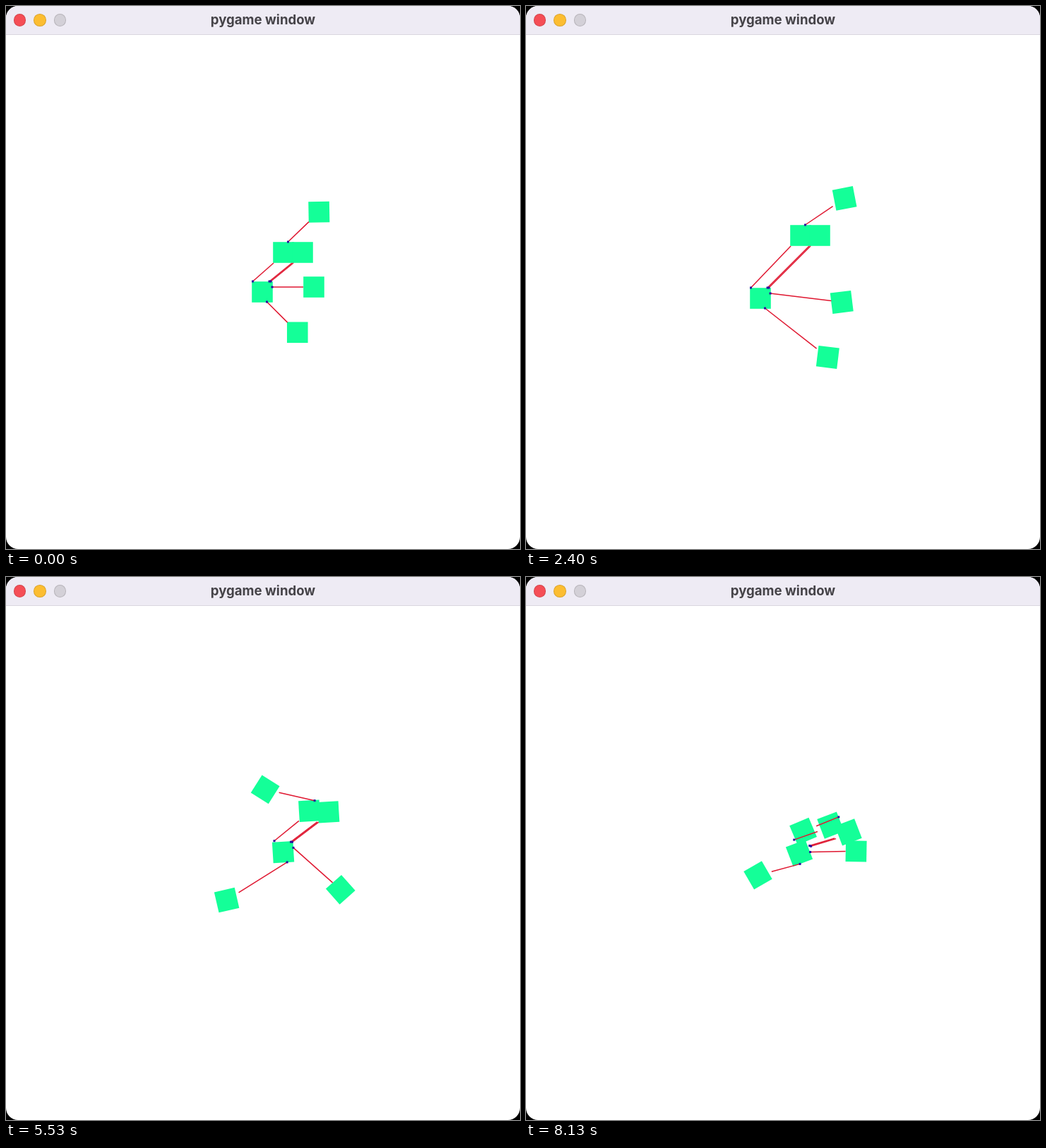
Recreate the animation shown at these times as an HTML page with a canvas. Size 728x769 px, loop 8190 ms.

```html
<!DOCTYPE html>
<html lang="en">
<head>
<meta charset="utf-8">
<title>pygame window</title>
<style>
  html, body { margin: 0; width: 100%; height: 100%; overflow: hidden; background: #000; }
  #window { position: relative; width: 728px; height: 769px; background: #fff; border-radius: 17px; overflow: hidden; }
  header { position: absolute; top: 0; left: 0; width: 728px; height: 40px; background: #eeebf4; border-bottom: 1px solid #dad7df;
    font: 700 18.6px/38px Inter, "Open Sans", sans-serif; color: #454348; text-align: center; }
  i { position: absolute; top: 11px; width: 17.5px; height: 17.5px; border-radius: 50%; box-sizing: border-box; border: 1px solid #0002; }
  canvas { position: absolute; top: 0; left: 0; }
</style>
</head>
<body>
<div id="window">
  <header>
    <i style="left:10.5px;background:#f54e56"></i>
    <i style="left:39px;background:#fcbd31"></i>
    <i style="left:67.5px;background:#d3d0d7"></i>
    pygame window
  </header>
  <canvas width="728" height="769"></canvas>
</div>
<script>
const ctx = document.querySelector('canvas').getContext('2d');
const LOOP = 8.19, FPS = 15, SIZE = 29.6;
const rad = deg => deg * Math.PI / 180;

// Eased path through [time, value] points, held at both ends
function glide(t, ...points) {
  let [t0, value] = points[0];
  for (const [t1, next] of points) {
    if (t < t1) {
      const u = Math.max(0, (t - t0) / (t1 - t0));
      return value + (next - value) * u * u * (3 - 2 * u);
    }
    [t0, value] = [t1, next];
  }
  return value;
}

// Spring length swinging around its mean, longest at the given time
const bounce = (t, mean, amp, peak, period) => mean + amp * Math.cos(2 * Math.PI * (t - peak) / period);

// Point at a local offset from a pose, turned with it
function at({ x, y, angle }, dx, dy) {
  const c = Math.cos(rad(angle)), s = Math.sin(rad(angle));
  return { x: x + dx * c - dy * s, y: y + dx * s + dy * c, angle };
}

// Box hanging on a joint; its anchor, held at the rest direction, faces the joint
function limb(joint, direction, length, rest, reach) {
  const ray = { ...joint, angle: direction };
  return {
    box: { ...at(ray, length, 0), angle: direction - rest },
    spring: [at(ray, length - reach, 0), joint]
  };
}

function scene(t) {
  const hub = {
    x: glide(t, [0, 363], [1.4, 353.5], [2.4, 332], [3.6, 421], [6.2, 387]),
    y: glide(t, [0, 405], [1.4, 399], [2.4, 414], [4.8, 404], [6.2, 377], [8.13, 391]),
    angle: glide(t, [2.4, 0], [3.6, -56], [6.4, 21])
  };
  const stretch = glide(t, [1.4, 0], [2.4, 1], [4.8, 0], [6.2, 0.25], [8.13, -0.1]);
  const left = at(hub, 30 + 27 * stretch, -56 - 33 * stretch);
  const right = at(left, 27, 0);

  const top = limb(at(left, 6.5, -15),
    glide(t, [0, -44], [1.4, -42], [2.4, -34], [3.6, -50], [6.4, -202]),
    bounce(t, 64, 12, 1.4, 4.8), -45, 20);
  const side = limb(at(hub, 14, -7),
    glide(t, [0, 0], [1.4, 10], [2.4, 7], [3.6, 69], [8.13, -1]),
    glide(t, [1.4, 59], [2.4, 102], [3.6, 56], [4.8, 98], [7, 65]), 0, 15);
  const bottom = limb(at(hub, 6.5, 14),
    glide(t, [1.4, 45], [2.4, 38], [3.6, 129], [4.8, 149], [6.2, 147], [8.13, 165]),
    bounce(t, 88, 27, 2.13, 4.1), 45, 20);

  return {
    boxes: [hub, left, right, top.box, side.box, bottom.box],
    springs: [
      top.spring, side.spring, bottom.spring,
      [at(left, -14, 15), at(hub, -13.5, -15)],
      [at(left, 12, 15), at(hub, 10, -15)],
      [at(right, -13, 15), at(hub, 12, -15)]
    ]
  };
}

function draw(t) {
  const { boxes, springs } = scene(t);
  ctx.clearRect(0, 0, 728, 769);
  ctx.fillStyle = '#14ff98';
  for (const { x, y, angle } of boxes) {
    ctx.save();
    ctx.translate(x, y);
    ctx.rotate(-rad(angle)); // boxes turn opposite to their anchors
    ctx.fillRect(-SIZE / 2, -SIZE / 2, SIZE, SIZE);
    ctx.restore();
  }
  ctx.strokeStyle = '#df1730';
  ctx.lineWidth = 1.5;
  ctx.fillStyle = '#2a10a0';
  for (const [from, to] of springs) {
    ctx.beginPath();
    ctx.moveTo(from.x, from.y);
    ctx.lineTo(to.x, to.y);
    ctx.stroke();
    ctx.fillRect(to.x - 1.5, to.y - 1.5, 3, 3);
  }
}

const start = performance.now();
function tick() {
  const t = (performance.now() - start) / 1000 % LOOP;
  draw(Math.floor((t + 0.005) * FPS) / FPS);
  requestAnimationFrame(tick);
}
tick();
</script>
</body>
</html>
```
